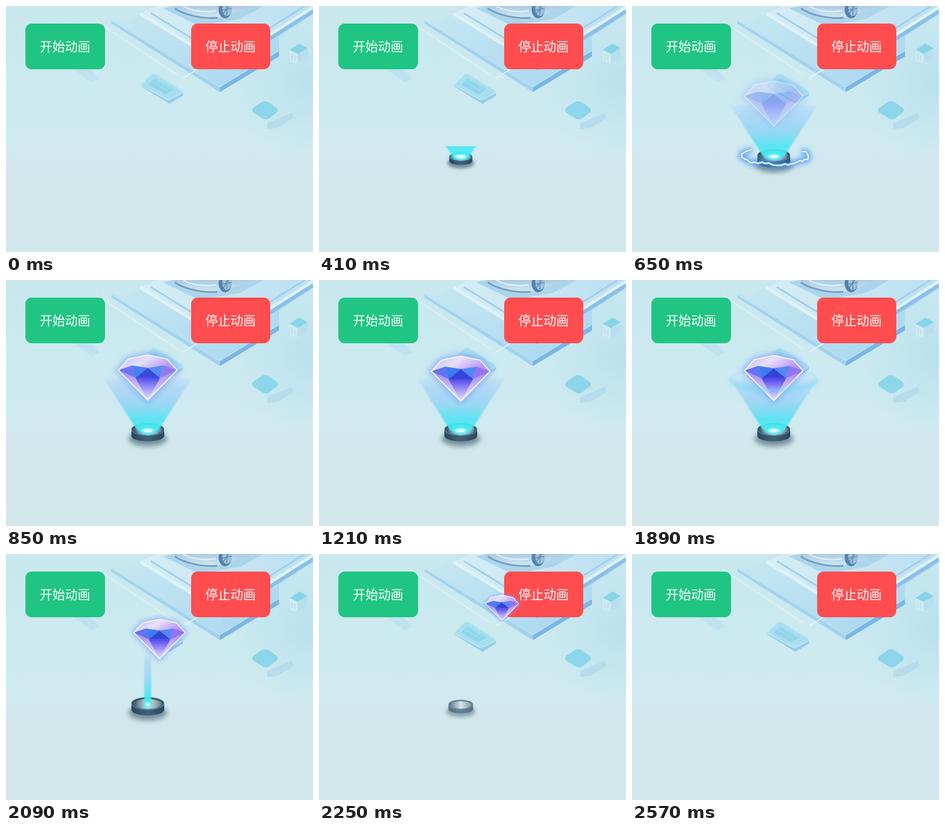
These frames come from a looping animation (524 px wide and 420 px high, 3610 ms). An HTML page:

```html
<!DOCTYPE html>
<html lang="zh">
<head>
<meta charset="utf-8">
<style>
html, body { margin: 0; width: 100%; height: 100%; overflow: hidden; background: #d2e7ec; }
svg { position: absolute; left: 0; top: 0; width: 524px; height: 420px; }
.btn {
  position: absolute; top: 29.5px; width: 135.5px; height: 78px; border-radius: 11px;
  background: #20c583; color: #fff; text-align: center;
  font: 500 21.5px/76px "Noto Sans CJK SC", "Noto Sans CJK", sans-serif;
}
.stop { background: #ff4d4f; }
</style>
</head>
<body>
<svg viewBox="0 0 524 420">
  <defs>
    <linearGradient id="sky" x2="0" y2="1">
      <stop offset="0" stop-color="#c8e8ee"/><stop offset=".35" stop-color="#cceaf0"/>
      <stop offset=".58" stop-color="#d0eaf0"/><stop offset=".68" stop-color="#d2e7ec"/>
    </linearGradient>
    <radialGradient id="side">
      <stop offset="0" stop-color="#b4dded" stop-opacity=".75"/><stop offset="1" stop-color="#b8e0ee" stop-opacity="0"/>
    </radialGradient>
    <linearGradient id="slab" x1="0" y1="0" x2="1" y2=".6">
      <stop offset="0" stop-color="#c8e8f0"/><stop offset=".5" stop-color="#b9e0f1"/><stop offset="1" stop-color="#a9d6f0"/>
    </linearGradient>
    <linearGradient id="plate" x2="1">
      <stop offset="0" stop-color="#d6eef4"/><stop offset="1" stop-color="#bcdff2"/>
    </linearGradient>
    <linearGradient id="car" x2="0" y2="1">
      <stop offset="0" stop-color="#a9cbe2"/><stop offset="1" stop-color="#d3e9f4"/>
    </linearGradient>
  </defs>
  <rect width="524" height="420" fill="url(#sky)"/>
  <ellipse cx="524" cy="130" rx="150" ry="130" fill="url(#side)"/>
  <path d="M112 106 140 104 160 124 146 130Z" fill="#b5dff0" opacity=".55"/>
  <!-- platform -->
  <path d="M180 25 207 23 250 0H524V14L466 52V78L367 140Z" fill="url(#slab)"/>
  <path d="M180 25 365 139V147L180 30Z" fill="#a3d2ee"/>
  <path d="M365 147 466 86V76L365 138Z" fill="#7ab6e6"/>
  <path d="M180 25 365 138 466 76" fill="none" stroke="#b9e0f3" stroke-width="1.5"/>
  <path d="M155 26 293 118" stroke="#dcf1f4" stroke-width="2"/>
  <path d="M302 123 330 106" stroke="#e4f5f8" stroke-width="2"/>
  <path d="M229 13 256 0H524V4L370 100Z" fill="url(#plate)"/>
  <path d="M229 13 370 100 524 2" fill="none" stroke="#dff3f7" stroke-width="5"/>
  <path d="M247 12 370 88 510 0" fill="none" stroke="#a0cfee" stroke-width="3"/>
  <path d="M370 107 524 9" stroke="#8abfe9" stroke-width="6"/>
  <path d="M268 4 330 34 400 22 440 0H285Z" fill="#acd5eb"/>
  <!-- car -->
  <path d="M286 0C290 8 304 14 325 18 342 22 354 22 364 19L386 13 424 0Z" fill="url(#car)"/>
  <path d="M288 4C302 14 335 23 361 20" fill="none" stroke="#729fc5" stroke-width="3"/>
  <path d="M302 0C315 8 340 12 358 8" fill="none" stroke="#e6f3f9" stroke-width="2"/>
  <ellipse cx="374" cy="6" rx="11" ry="15" fill="#5681ac"/>
  <ellipse cx="377" cy="5" rx="8" ry="12" fill="#9dc2dd"/>
  <path d="M377-8V16M369 7 385 4M371 13 383-4" stroke="#638daf" stroke-width="1.5"/>
  <!-- small blocks -->
  <path d="M230 137 234 131 280 158 302 147V153L279 167Z" fill="#93cdea"/>
  <path d="M230 135 247 118Q251 114 257 117L299 143Q304 147 298 150L282 158Q277 161 272 158Z" fill="#a8dfee" stroke="#c0e9f2" stroke-width="1.5"/>
  <path d="M242 134 254 123 286 142 272 151Z" fill="#91d6ea"/>
  <path d="M248 128 276 145M254 124 282 142" stroke="#b0e2ef"/>
  <path d="M446 200 488 182 491 191 464 208 446 210Z" fill="#add6ea" opacity=".6"/>
  <path d="M422 174 436 164Q441 161 448 164L462 174Q466 178 462 182L449 192Q444 195 438 192L422 182Q418 178 422 174Z" fill="#8dd6e9"/>
  <path d="M484 75 501 64 515 72 498 82Z" fill="#86d5e7"/>
  <path d="M484 75V95L498 98V82Z" fill="#cdeaf1"/>
  <path d="M498 82 515 72V89L498 98Z" fill="#b9dfed"/>
  <path d="M488 82V93M493 84V94" stroke="#b8deea" stroke-width="1.5"/>
</svg>

<div class="btn" style="left:33px">开始动画</div>
<div class="btn stop" style="left:315.5px">停止动画</div>

<svg viewBox="0 0 524 420">
  <defs>
    <linearGradient id="light" gradientUnits="userSpaceOnUse" x1="0" y1="162" x2="0" y2="262">
      <stop offset="0" stop-color="#a4cefa" stop-opacity="0"/><stop offset=".2" stop-color="#a0ccf8" stop-opacity=".5"/>
      <stop offset=".5" stop-color="#86d0f6" stop-opacity=".7"/><stop offset=".75" stop-color="#4be3f1" stop-opacity=".85"/>
      <stop offset="1" stop-color="#45f4f6"/>
    </linearGradient>
    <radialGradient id="halo">
      <stop offset="0" stop-color="#8db4fa" stop-opacity=".6"/><stop offset=".6" stop-color="#9cc6f8" stop-opacity=".35"/>
      <stop offset="1" stop-color="#a8d4f8" stop-opacity="0"/>
    </radialGradient>
    <radialGradient id="core">
      <stop offset="0" stop-color="#fff"/><stop offset=".3" stop-color="#c9fdff"/>
      <stop offset=".6" stop-color="#55ecf5" stop-opacity=".8"/><stop offset="1" stop-color="#2fd8ef" stop-opacity="0"/>
    </radialGradient>
    <linearGradient id="rim" x2="1">
      <stop offset="0" stop-color="#2a465e"/><stop offset=".5" stop-color="#41617a"/><stop offset="1" stop-color="#2b465e"/>
    </linearGradient>
    <linearGradient id="metal" x2="1">
      <stop offset="0" stop-color="#40596b"/><stop offset=".5" stop-color="#dde8ea"/><stop offset="1" stop-color="#64808d"/>
    </linearGradient>
    <linearGradient id="crown" x2="1" y2=".4">
      <stop offset="0" stop-color="#b9b4fb"/><stop offset=".5" stop-color="#e9e0fc"/><stop offset="1" stop-color="#b592f5"/>
    </linearGradient>
    <linearGradient id="keel" x2="0" y2="1">
      <stop offset="0" stop-color="#4e46ee"/><stop offset=".4" stop-color="#9388f7"/><stop offset="1" stop-color="#efeaff"/>
    </linearGradient>
    <linearGradient id="flank" x2="0" y2="1">
      <stop offset="0" stop-color="#a084f5"/><stop offset=".5" stop-color="#c9b8fa"/><stop offset="1" stop-color="#f3eeff"/>
    </linearGradient>
    <filter id="b1" x="-20%" y="-30%" width="140%" height="160%"><feGaussianBlur stdDeviation=".8"/></filter>
    <filter id="b4" x="-50%" y="-80%" width="200%" height="260%"><feGaussianBlur stdDeviation="4"/></filter>
    <clipPath id="reveal"><rect id="window" width="524" height="420"/></clipPath>
  </defs>
  <g id="base">
    <ellipse cx="0" cy="9" rx="33" ry="13" fill="#395564" opacity=".6" filter="url(#b4)"/>
    <path d="M-28-7V4A28 9.5 0 0 0 28 4V-7Z" fill="url(#rim)"/>
    <ellipse cy="-7" rx="28" ry="10.5" fill="#35566b" stroke="#6ca9bb"/>
    <ellipse cy="-6" rx="24" ry="8.5" fill="url(#metal)"/>
  </g>
  <g id="rays" clip-path="url(#reveal)">
    <ellipse id="aura" cx="242" cy="166" rx="72" ry="58" fill="url(#halo)"/>
    <path id="cone" fill="url(#light)" filter="url(#b1)"/>
    <ellipse id="spot" cx="242" cy="257" ry="8" fill="url(#core)"/>
  </g>
  <g id="ringBack" fill="none" stroke="#5ddcf3">
    <path d="M168 170A74 18 0 0 1 316 170" stroke-width="3" opacity=".45" filter="url(#b1)"/>
  </g>
  <g id="gem" stroke-linejoin="round">
    <path d="M-50-12-33-31 0-38 33-31 50-12 0 39Z" fill="#7d9cff" stroke="#7d9cff" stroke-width="9" opacity=".6" filter="url(#b4)"/>
    <path d="M-50-12-33-31 0-38 33-31 50-12 27-20 0-16-27-20Z" fill="url(#crown)"/>
    <path d="M-50-12-27-20-21 1Z" fill="#6571f3"/>
    <path d="M-27-20 0-16-21 1Z" fill="#3d7df1"/>
    <path d="M0-16 21 1H-21Z" fill="#3443d8"/>
    <path d="M0-16 27-20 21 1Z" fill="#5388f4"/>
    <path d="M27-20 50-12 21 1Z" fill="#9573ee"/>
    <path d="M-50-12-21 1 0 39ZM21 1 50-12 0 39Z" fill="url(#flank)"/>
    <path d="M-21 1H21L0 39Z" fill="url(#keel)"/>
    <path d="M-50-12-33-31 0-38 33-31 50-12 0 39Z" fill="none" stroke="#f5f5ff" stroke-width="2"/>
  </g>
  <g id="ringFront" fill="none">
    <path d="M168 170A74 18 0 0 0 316 170" stroke="#38d5f5" stroke-width="7" opacity=".6" filter="url(#b4)"/>
    <path d="M168 170A74 18 0 0 0 316 170" stroke="#5be3f6" stroke-width="4" opacity=".9" filter="url(#b1)"/>
  </g>
  <g id="bolt" fill="none" stroke-linejoin="round">
    <path stroke="#3f8ff5" stroke-width="9" opacity=".75" filter="url(#b4)"/>
    <path stroke="#7dbbff" stroke-width="3.5" filter="url(#b1)"/>
    <path stroke="#fff" stroke-width="1.8"/>
  </g>
</svg>

<script>
const LOOP = 3610, STEP = 40;
const $ = id => document.getElementById(id);
const ramp = (t, a, b) => Math.min(1, Math.max(0, (t - a) / (b - a)));
const mix = (a, b, k) => a + (b - a) * k;
const set = (id, attrs) => { for (const k in attrs) $(id).setAttribute(k, attrs[k]); };
const noise = n => { const v = Math.sin(n * 127.1) * 43758.5453; return v - Math.floor(v) - .5; };

function boltPath(seed) {
  let d = '';
  for (let i = 0; i <= 40; i++) {
    const a = mix(-.65, 3.95, i / 40);
    const x = 244.5 + Math.cos(a) * 57 + noise(i + seed * 61) * 4;
    const y = 256 + Math.sin(a) * 14 + noise(i * 3 + seed * 17) * 5;
    d += (i ? 'L' : 'M') + x.toFixed(1) + ' ' + y.toFixed(1);
  }
  return d;
}

function draw(t) {
  // pedestal pops up and later shrinks away
  const out = ramp(t, 2170, 2490);
  const size = ramp(t, 270, 470) * (1 - out);
  set('base', { transform: `translate(242 262) scale(${size})`, opacity: 1 - out });

  // light cone rises, then closes into a thin column
  const close = ramp(t, 1950, 2090), gone = ramp(t, 2090, 2210);
  const top = mix(75, 6, close), foot = mix(19, 6, close) * Math.min(1, size + .1);
  set('window', { y: mix(258, 100, ramp(t, 330, 610) ** 1.7) });
  set('cone', { d: `M${242 - top} 168H${242 + top}L${242 + foot} 255Q242 268 ${242 - foot} 255Z` });
  set('aura', { opacity: .6 * (1 - close) });
  set('spot', { rx: mix(20, 9, close) });
  set('rays', { opacity: t < 290 ? 0 : 1 - gone });

  // gem fades in, floats, flies to the corner
  const fly = ramp(t, 2026, 2490);
  const bob = t > 810 ? 1 - Math.cos((t - 810) / 880 * 2 * Math.PI) : 0;
  const y = mix(166 + bob * (1 - ramp(t, 1930, 2010)), 12, fly);
  set('gem', {
    transform: `translate(${mix(242, 387.5, fly)} ${y}) scale(${mix(1, .1, fly)})`,
    opacity: t < 2570 ? ramp(t, 530, 870) : 0
  });

  const ring = ramp(t, 1370, 1530) * (1 - ramp(t, 1770, 1970));
  set('ringBack', { opacity: ring });
  set('ringFront', { opacity: ring });

  const spark = ramp(t, 490, 570) * (1 - ramp(t, 730, 850));
  set('bolt', { opacity: spark });
  if (spark) {
    const d = boltPath(Math.floor(t / 80));
    for (const p of $('bolt').children) p.setAttribute('d', d);
  }
}

const start = performance.now();
function tick(now) {
  const t = Math.max(0, now - start) % LOOP;
  draw(Math.floor((t - 10) / STEP) * STEP + 10);
  requestAnimationFrame(tick);
}
draw(0);
requestAnimationFrame(tick);
</script>
</body>
</html>
```
